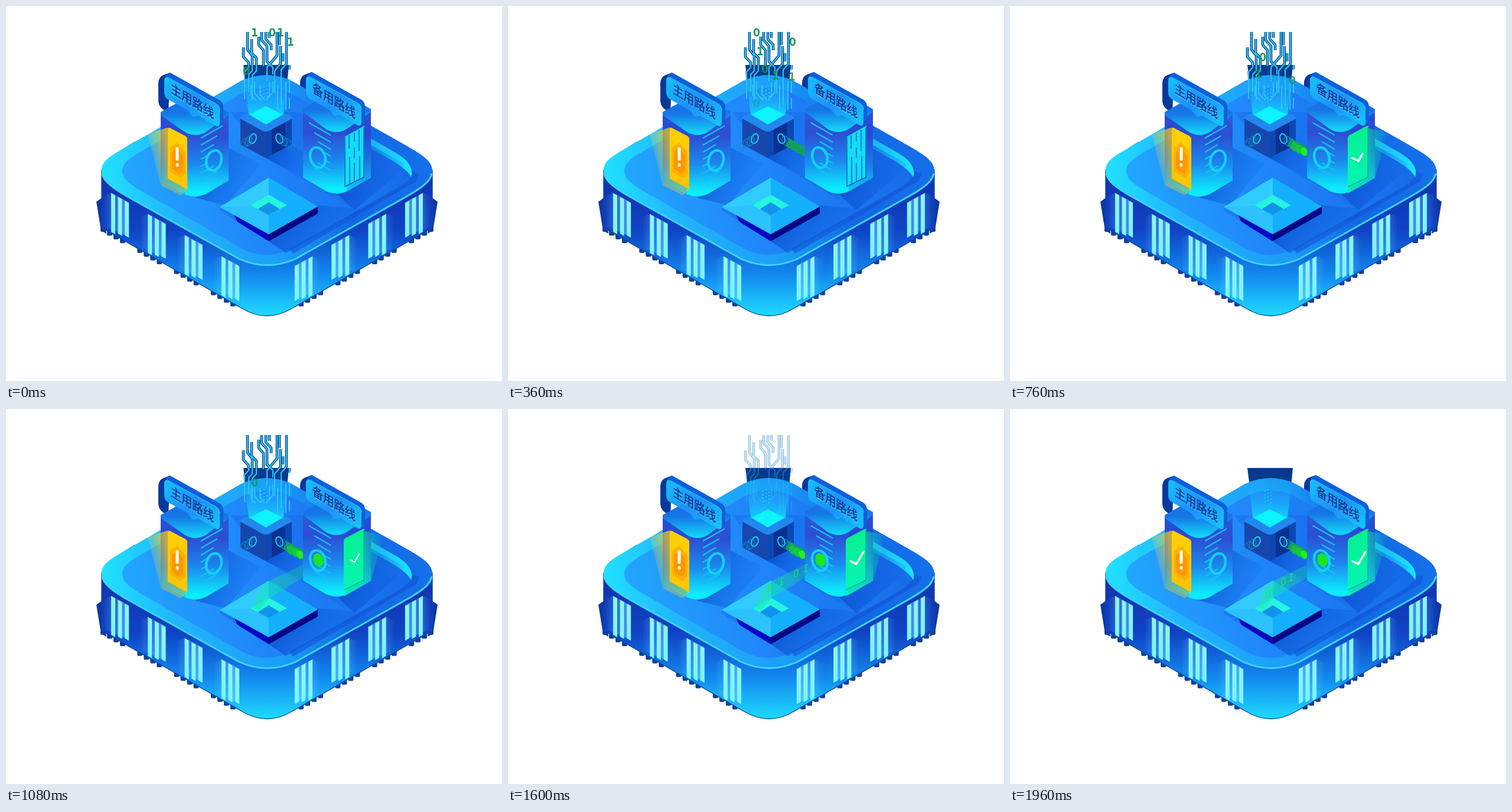
Animation, 840 px wide and 636 px high, one loop 2 s. Source, as an HTML page:

```html
<!DOCTYPE html>
<html lang="zh">
<head>
<meta charset="utf-8">
<style>
html, body { margin: 0; width: 100%; height: 100%; overflow: hidden; background: #fff; }
svg { display: block; width: 840px; height: 636px; }
.sign { font: 21px "Noto Sans CJK SC", "Noto Sans CJK", sans-serif; }
.digit { font: 18px "DejaVu Sans", sans-serif; text-anchor: middle; }
</style>
</head>
<body>
<svg viewBox="0 0 840 636" fill="none">
<defs>
  <linearGradient id="side" gradientUnits="userSpaceOnUse" x1="0" y1="290" x2="0" y2="526">
    <stop stop-color="#1233ae"/><stop offset=".38" stop-color="#0f43c4"/>
    <stop offset=".7" stop-color="#1288ee"/><stop offset="1" stop-color="#1fdcff"/>
  </linearGradient>
  <linearGradient id="rim" gradientUnits="userSpaceOnUse" x1="162" y1="290" x2="722" y2="270">
    <stop stop-color="#20e2ff"/><stop offset=".22" stop-color="#22b4fc"/>
    <stop offset=".55" stop-color="#1b9cf8"/><stop offset=".75" stop-color="#1268e4"/><stop offset="1" stop-color="#1670ea"/>
  </linearGradient>
  <linearGradient id="floor" gradientUnits="userSpaceOnUse" x1="200" y1="300" x2="680" y2="240">
    <stop stop-color="#22a6ff"/><stop offset=".45" stop-color="#2086fa"/><stop offset="1" stop-color="#176ce8"/>
  </linearGradient>
  <linearGradient id="wall" gradientUnits="userSpaceOnUse" x1="590" y1="0" x2="690" y2="0">
    <stop stop-color="#1f9cf6"/><stop offset="1" stop-color="#18e8ff"/>
  </linearGradient>
  <linearGradient id="box" x2="0" y2="1">
    <stop stop-color="#2f62e0"/><stop offset=".4" stop-color="#2c4ed4"/>
    <stop offset=".68" stop-color="#1a8aee"/><stop offset=".95" stop-color="#0cecff"/>
  </linearGradient>
  <linearGradient id="lid" x2="0" y2="1">
    <stop stop-color="#1b6ce8"/><stop offset=".45" stop-color="#1676e6"/><stop offset="1" stop-color="#12dcfa"/>
  </linearGradient>
  <linearGradient id="plate" x2="1" y2="1">
    <stop stop-color="#18c0ff"/><stop offset=".5" stop-color="#1c90f8"/><stop offset="1" stop-color="#14c8ff"/>
  </linearGradient>
  <linearGradient id="bar" x2="0" y2="1">
    <stop stop-color="#8cf4ff"/><stop offset="1" stop-color="#7cf4ff"/>
  </linearGradient>
  <linearGradient id="haze"><stop stop-color="#6fd0ff" stop-opacity="0"/><stop offset="1" stop-color="#6fd8ff" stop-opacity=".65"/></linearGradient>
  <linearGradient id="shade" x2="1" y2=".3"><stop stop-color="#0848c4" stop-opacity=".85"/><stop offset="1" stop-color="#0c58dc" stop-opacity=".1"/></linearGradient>
  <linearGradient id="warn" x2="0" y2="1"><stop stop-color="#ffd000"/><stop offset="1" stop-color="#ffc400"/></linearGradient>
  <linearGradient id="warnGlow" gradientUnits="userSpaceOnUse" x1="242" y1="265" x2="280" y2="255">
    <stop stop-color="#ffe040" stop-opacity="0"/><stop offset="1" stop-color="#ffd010" stop-opacity=".7"/>
  </linearGradient>
  <linearGradient id="okFill" x2="0" y2="1"><stop stop-color="#06f08e"/><stop offset="1" stop-color="#06f4b4"/></linearGradient>
  <linearGradient id="okGlow" gradientUnits="userSpaceOnUse" x1="600" y1="0" x2="640" y2="0">
    <stop stop-color="#08f0a0" stop-opacity=".7"/><stop offset="1" stop-color="#08e0b0" stop-opacity="0"/>
  </linearGradient>
  <linearGradient id="beam" x2="0" y2="1">
    <stop stop-color="#12a0f4" stop-opacity=".1"/><stop offset=".45" stop-color="#18c4fa" stop-opacity=".45"/><stop offset="1" stop-color="#04f6ff"/>
  </linearGradient>
  <linearGradient id="edge" gradientUnits="userSpaceOnUse" x1="0" y1="98" x2="0" y2="124">
    <stop stop-color="#0a4a8c"/><stop offset="1" stop-color="#0a4a8c" stop-opacity="0"/>
  </linearGradient>
  <linearGradient id="strip" gradientUnits="userSpaceOnUse" x1="510" y1="270" x2="430" y2="315">
    <stop stop-color="#10d890" stop-opacity=".3"/><stop offset="1" stop-color="#18e8a8" stop-opacity=".5"/>
  </linearGradient>

  <path id="signBack" fill="#07399a" d="M258 132Q258 120 267 117L278 113 275 180Q258 174 258 160Z"/>
  <g id="signPlate">
    <path fill="#0b60da" d="M268 126Q269 116 278 113L362 160Q368 164 368 172V199L358 205 300 165Z"/>
    <path fill="url(#plate)" d="M268 127Q268 119 275 122L356 166Q362 170 362 177V199Q361 206 355 203L326 186 316 188 308 177 274 158Q268 154 268 147Z"/>
    <path stroke="#35d4ff" d="M269 125Q270 119 276 122L356 166Q362 170 362 177"/>
  </g>

  <g id="cabinet">
    <path fill="url(#box)" d="M262 180 305 156Q320 149 335 156L377 180V296L338 319Q320 327 302 319L262 296Z"/>
    <path fill="#1c30c8" opacity=".22" d="M262 181 303 213V319L262 296Z"/>
    <path fill="url(#lid)" d="M262 180 305 156Q320 149 335 156L377 180V185L338 214Q320 224 302 213L262 185Z"/>
    <path stroke="#14bff2" stroke-width="2.4" d="M330 224l37-21M330 236l28-16M330 248l22-13M330 260l12-7M330 272l12-7M330 284l22-13M330 296l28-16"/>
    <ellipse cx="352" cy="262" rx="12.5" ry="17.5" transform="rotate(17 352 262)" stroke="#12d0fa" stroke-width="4.4"/>
  </g>

  <g id="rings" stroke="#18cfee" stroke-width="2">
    <ellipse cx="463" cy="225" rx="5.5" ry="8.5" transform="rotate(-20 463 225)"/>
    <g stroke="#1590c8" stroke-width="1.4">
      <ellipse cx="470" cy="229" rx="5.5" ry="8.5" transform="rotate(-20 470 229)" opacity=".9"/>
      <ellipse cx="477" cy="233" rx="5.5" ry="8.5" transform="rotate(-20 477 233)" opacity=".7"/>
      <ellipse cx="483" cy="237" rx="5.5" ry="8.5" transform="rotate(-20 483 237)" opacity=".5"/>
      <ellipse cx="489" cy="241" rx="5.5" ry="8.5" transform="rotate(-20 489 241)" opacity=".35"/>
    </g>
  </g>

  <path id="traces" d="M402 70V86L411 96V104L404 112V158M409 44V74L417 84V110L411 116V146M416 56V80L424 88V110L417 118V160
    M428 52V66L436 75V102M433 44V58L442 68V94L452 104V116M440 44V56L449 66V75M446 44V54M459 44V84L442 104V128
    M463 44V66M465 68V98L455 110V148M475 44V98L466 108V168M469 80V94M480 100V108M480 124V148M474 128V176M480 156V174
    M415 134V152L424 160M421 128V148L432 160M430 134V150L438 160M446 130V152L440 160M452 128V146L444 156M460 134V176"/>
</defs>

<g id="base">
  <path fill="#0f37a8" d="M153 332 164 324 170 386 161 381ZM731 332 720 324 714 386 723 381Z"/>
  <path fill="#0a48b0" d="M202 240 218 230V236L202 245Z"/>
  <path fill="#063a8e" d="M402 100H479L476 132H406Z"/>
  <use href="#signBack"/>
  <use href="#signBack" x="240" y="-1"/>
  <g id="pegs" fill="#123f96"></g>
  <path fill="url(#side)" stroke="#0b46a4" stroke-width="1.4" d="M162 278V376L400 513Q442 538 484 513L722 376V278Z"/>
  <g id="fins"></g>
  <path fill="url(#rim)" d="M205 238 398 127Q441 107 484 127L680 238C708 254 722 264 722 280 722 296 708 306 682 321L490 430Q442 452 395 430L202 321C176 306 162 296 162 278 162 262 178 254 205 238Z"/>
  <path stroke="#3cd4ff" stroke-width="3" d="M163 284C165 296 178 307 202 321L395 429Q442 450 490 429L682 321C706 307 719 297 721 284"/>
  <path fill="url(#floor)" d="M230 246 400 148Q441 128 482 148L655 246C680 260 688 270 688 280 688 290 680 298 655 313L482 412Q441 432 400 412L228 313C205 300 197 290 197 280 197 268 205 260 230 246Z"/>
  <path fill="url(#wall)" d="M590 209 655 246C680 260 690 272 687 292 682 281 672 273 652 261L590 226Z"/>
  <path fill="#1668e8" opacity=".45" d="M380 180 500 180 655 290 590 345 440 258Z"/>
  <path fill="#1254d6" opacity=".6" d="M480 412 655 313C680 299 688 290 688 280L700 285 695 297 486 420Z"/>
  <path fill="url(#shade)" d="M320 325 377 294V240L432 268 372 338Z"/>
  <path fill="url(#shade)" d="M562 320 618 290V236L676 268 660 288 590 346Z"/>
  <path fill="url(#shade)" d="M440 258 484 236 512 254 502 290Z"/>
  <path fill="url(#shade)" d="M445 399 528 338 604 344 474 419Z"/>
</g>

<g id="cube">
  <path fill="#1747ac" d="M397 191 440 213V258L397 235Z"/>
  <path fill="#0c48b4" d="M484 191 440 213V258L484 235Z"/>
  <path fill="#0a3192" d="M450 209 473 198V241L450 252Z"/>
  <path fill="#2188ee" d="M397 191Q396 187 402 185L432 175H449L479 185Q485 187 484 191L447 211Q440 215 433 211Z"/>
  <path fill="url(#beam)" d="M404 124Q441 112 477 124L470 184 440 201 411 184Z"/>
  <path fill="#0ff2ff" d="M413 184 440 170 468 184 440 200Z"/>
  <path stroke="#16d0ff" stroke-width="2" stroke-dasharray="2 4" d="M432 138V160M437 136V160M442 140V160"/>
</g>
<use href="#rings"/>
<use href="#rings" transform="matrix(-1 0 0 1 881 0)"/>

<g id="flow" stroke-linejoin="round">
  <use href="#traces" stroke="url(#edge)" stroke-width="4.6"/>
  <use href="#traces" stroke="#2cc4f4" stroke-width="2"/>
</g>

<g id="pipe">
  <path stroke="#10a05c" stroke-width="14" d="M473 231 506 249"/>
</g>
<g id="beads">
  <ellipse cx="482" cy="239" rx="6" ry="8" transform="rotate(-20 482 239)" fill="#16bd48"/>
  <ellipse cx="490" cy="243" rx="6" ry="8" transform="rotate(-20 490 243)" fill="#16c83c"/>
  <ellipse cx="498" cy="247" rx="5.5" ry="7.5" transform="rotate(-20 498 247)" fill="#1cf01c"/>
</g>

<use href="#cabinet"/>
<use href="#cabinet" transform="matrix(-1 0 0 1 880 -5)"/>
<ellipse id="gear" cx="529" cy="256" rx="8.5" ry="11.5" transform="rotate(-17 529 256)" fill="#1be71f"/>

<g id="warning">
  <path fill="url(#warnGlow)" d="M240 217 274 206V293L262 304Z"/>
  <path fill="#ffd010" opacity=".35" d="M274 293 307 311 296 321 262 304Z"/>
  <path fill="url(#warn)" d="M274 209Q274 205 278 207L303 220Q307 222 307 226V311L274 293Z"/>
  <path fill="#ffb000" d="M278 240 290 232 304 248V284L296 292 278 281Z"/>
  <path fill="#ff9800" d="M281 248 290 241 300 254V278L294 285 281 276Z"/>
  <path stroke="#fff" stroke-width="5" stroke-linecap="round" d="M290 242V260M290 269V270"/>
</g>

<g id="doorOff">
  <path fill="#12dcfc" d="M573 222 607 203V290L573 307Z"/>
  <path stroke="#0c62c0" stroke-width="1.5" d="M574 222V306L607 290M581 219V242M582 256V301M590 215V230M590 240V258M590 266V297M598 210V246M599 254V293M606 206V290"/>
</g>
<g id="doorOn">
  <path fill="url(#okGlow)" d="M600 206 640 214 618 292 572 318V306L606 290Z"/>
  <path fill="url(#okFill)" d="M572 224Q572 221 575 219L603 204Q606 203 606 206V290L572 307Z"/>
  <path stroke="#0a9ca8" d="M572 307 606 290V206"/>
  <path id="check" stroke="#fff" stroke-linecap="round" stroke-linejoin="round" pathLength="100" stroke-dasharray="100"/>
</g>

<use href="#signPlate"/>
<use href="#signPlate" x="240" y="-1"/>
<g class="sign">
  <g fill="#6fe0ff" opacity=".6"><text transform="matrix(.87 .54 0 1 280 148)">主用路线</text><text transform="matrix(.87 .54 0 1 520 147)">备用路线</text></g>
  <g fill="#0b3796" stroke="#0b3796" stroke-width=".5"><text transform="matrix(.87 .54 0 1 279 146)">主用路线</text><text transform="matrix(.87 .54 0 1 519 145)">备用路线</text></g>
</g>

<g id="chip">
  <path fill="#0206c4" d="M362 341 445 387V399L362 347Z" opacity=".15"/>
  <path fill="#0206c4" d="M386 354 445 387V399L392 366Z"/>
  <path fill="#020884" d="M445 387 528 340V352L445 399Z"/>
  <path fill="#14b0ff" d="M362 341 445 291 528 340 445 387Z"/>
  <path fill="#30ccff" d="M362 341 445 291V320L414 338 445 356V387Z"/>
  <path fill="#20a8fc" d="M362 341 414 338 445 356V387Z" opacity=".3"/>
  <path fill="#24f4e0" d="M414 338 445 320 476 338 462 345 445 333 427 345Z"/>
  <path fill="#1094ea" d="M427 344 445 333 463 344 445 354Z"/>
</g>
<path id="lane" fill="url(#strip)" d="M503 264V286L447 320 430 340 418 338 432 301 445 292Z"/>
<g id="digits" class="digit"></g>
</svg>
<script>
const $ = id => document.getElementById(id);
const clamp = v => Math.max(0, Math.min(1, v));
const ramp = (t, a, b) => clamp((t - a) / (b - a));
const show = (id, v) => $(id).setAttribute('opacity', v);

// light bars and pegs, mirrored about the middle of the platform
let fins = '', pegs = '';
for (let g = 0; g < 4; g++) {
  const x = 178 + 62.3 * g, y = 317 + 35.8 * g;
  fins += `<path fill="url(#haze)" d="M${x - 14} ${y + 6}L${x} ${y} ${x + 30} ${y + 16}V${y + 74}L${x - 10} ${y + 58}Z"/>`;
  for (let i = 0; i < 3; i++) {
    const bx = x + 11.6 * i, by = y + 6.6 * i;
    fins += `<path fill="url(#bar)" d="M${bx} ${by}l7 4V${y + 70 + 3 * i}l-7 -4Z"/>`;
  }
  for (let i = 0; i < 4; i++)
    pegs += `<rect x="${x - 18 + 11 * i}" y="${y + 57 + 6.4 * i}" width="9" height="9" rx="2"/>`;
}
const both = s => s + `<g transform="matrix(-1 0 0 1 884 0)">${s}</g>`;
$('fins').innerHTML = both(fins);
$('pegs').innerHTML = both(pegs);

// falling digits: character, then [time, x, y] stops
const falling = [
  ['1', [0, 421, 45], [360, 427, 77], [760, 421, 115], [960, 421, 136]],
  ['0', [0, 451, 45], [360, 435, 107], [720, 434, 165]],
  ['1', [0, 465, 45], [360, 453, 118], [640, 450, 168]],
  ['1', [0, 482, 61], [360, 481, 120], [640, 474, 168]],
  ['0', [0, 407, 110], [360, 421, 165], [480, 426, 180]],
  ['0', [320, 421, 43], [360, 421, 45], [760, 428, 87], [1080, 421, 125], [1200, 421, 140]],
  ['0', [320, 482, 56], [360, 482, 61], [760, 478, 126], [1000, 472, 165]]
];
// gliding digits: character and time of leaving the gear
const gliding = [['0', 1110], ['1', 1256], ['0', 1408], ['1', 1493], ['0', 1616], ['1', 1699]];
const glideTime = 680;

function fall(stops, t) {
  const last = stops.length - 1;
  if (t < stops[0][0] || t >= stops[last][0]) return null;
  const i = stops.findIndex(s => t < s[0]);
  const [a, b] = [stops[i - 1], stops[i]], k = ramp(t, a[0], b[0]);
  return [a[1] + (b[1] - a[1]) * k, a[2] + (b[2] - a[2]) * k];
}

// slows down along the lane, then drops into the chip
function glide(birth, t) {
  const age = t - birth;
  if (age < 0 || age > glideTime) return null;
  const x = 362 + 166 * .75 ** (age / 200);
  return [x, 257 + (528 - x) * .55 + Math.max(0, 441 - x) * 1.6];
}

function addDigit(ch, attrs, at, style) {
  const el = document.createElementNS('http://www.w3.org/2000/svg', 'text');
  el.textContent = ch;
  for (const k in attrs) el.setAttribute(k, attrs[k]);
  $('digits').append(el);
  return { el, at, ...style };
}
const digits = [
  ...falling.map(([ch, ...stops]) => addDigit(ch, { fill: '#1cc656', stroke: '#0c7c4c', 'stroke-width': .9 }, t => fall(stops, t), {
    matrix: '1 0 0 1', fade: y => 1 - .65 * ramp(y, 110, 170)
  })),
  ...gliding.map(([ch, birth]) => addDigit(ch, { fill: '#14ec58' }, t => glide(birth, t), {
    matrix: '-.85 .3 0 .95', fade: y => 1 - .4 * ramp(y, 295, 320)
  }))
];

function draw(t) {
  for (const { el, at, matrix, fade } of digits) {
    const p = at(t);
    el.style.display = p ? '' : 'none';
    if (!p) continue;
    el.setAttribute('transform', `matrix(${matrix} ${p[0]} ${p[1] + 6.3})`);
    el.setAttribute('opacity', fade(p[1]));
  }
  show('flow', 1 - ramp(t, 1440, 1680));
  show('pipe', ramp(t, 160, 360));
  show('beads', ramp(t, 480, 720));
  show('gear', ramp(t, 800, 920));
  show('lane', ramp(t, 920, 1080));
  show('doorOn', ramp(t, 400, 560));

  // the check draws on, dips in size and settles
  const s = 1 - .32 * (ramp(t, 840, 1080) - ramp(t, 1120, 1360));
  const pt = (x, y) => `${591 + (x - 591) * s} ${253 + (y - 253) * s}`;
  const check = $('check');
  check.setAttribute('d', `M${pt(580, 258)}L${pt(590, 263)} ${pt(602, 242)}`);
  check.setAttribute('stroke-width', 3.4 - 4.4 * (1 - s));
  check.setAttribute('stroke-dashoffset', 100 - 100 * ramp(t, 560, 840));
  check.style.display = t > 560 ? '' : 'none';
}

const start = performance.now();
function tick() {
  draw(Math.floor((performance.now() - start) % 2000 / 40) * 40);
  requestAnimationFrame(tick);
}
tick();
</script>
</body>
</html>
```
